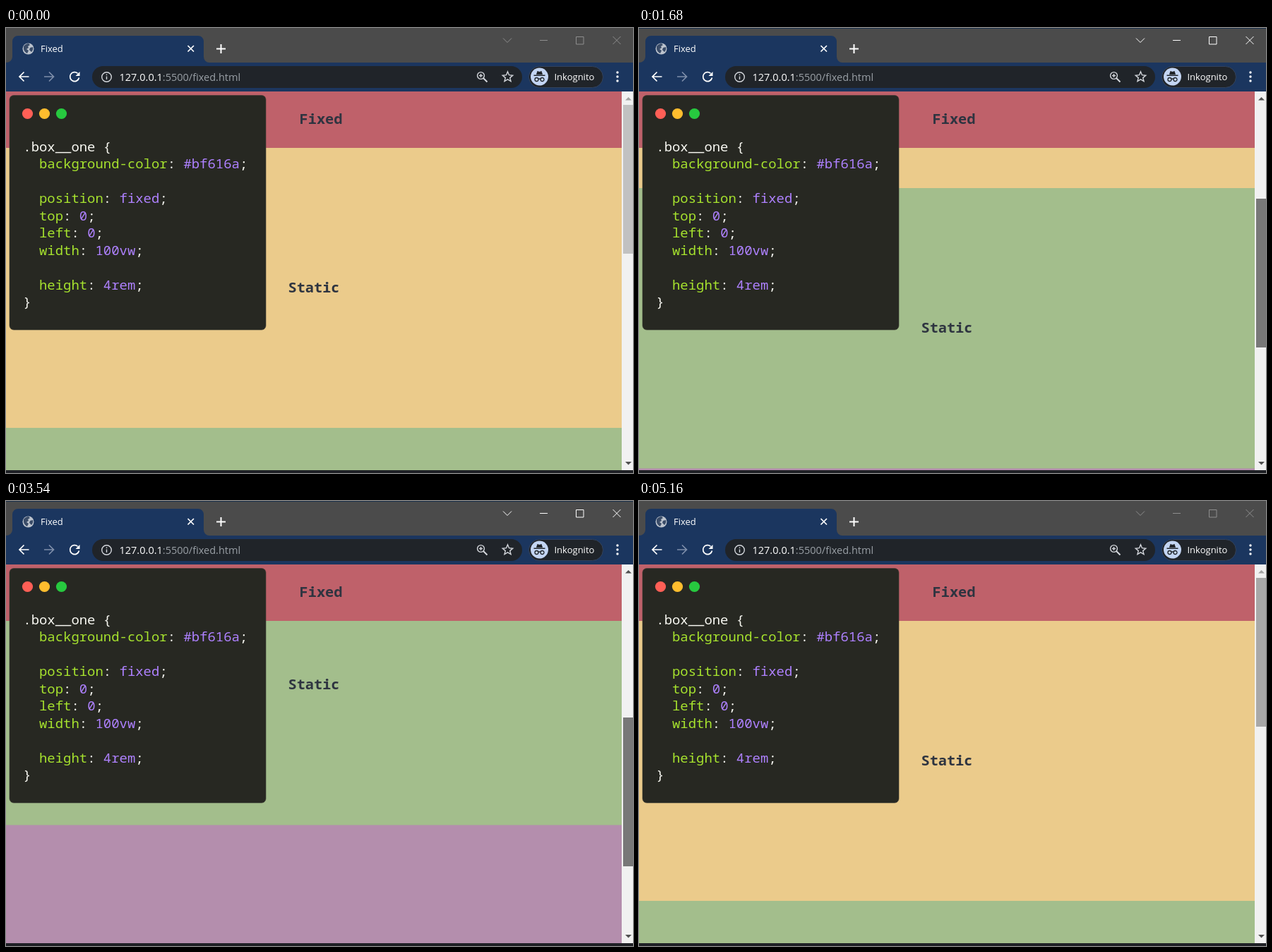
Recreate the animation shown at these times as an HTML page. Size 888 px wide and 631 px high, loop 5280 ms.

```html
<!DOCTYPE html>
<html lang="de">
<head>
<meta charset="utf-8">
<title>Fixed</title>
<style>
  html, body { margin: 0; width: 100%; height: 100%; overflow: hidden; background: #1e2025; }
  svg { display: block; width: 888px; height: 631px; }
  text { white-space: pre; }
  .ui { font: 13px "Open Sans", "Noto Sans", sans-serif; fill: #fff; }
  .url { font-size: 14.5px; }
  .label { font: bold 20.3px "Noto Sans Mono", "DejaVu Sans Mono", monospace; fill: #2e3440; text-anchor: middle; }
  .code { font: 18.93px "Noto Sans Mono", "DejaVu Sans Mono", monospace; fill: #f8f8f2; }
  .prop { fill: #a6e22e; }
  .val { fill: #ae81ff; }
  .line { fill: none; stroke: #fff; }
</style>
</head>
<body>
<svg viewBox="0 0 888 631">
  <defs><clipPath id="view"><rect y="90" width="872" height="537"/></clipPath></defs>

  <!-- page -->
  <g clip-path="url(#view)">
    <g id="page"></g>
    <rect y="90" width="872" height="80" fill="#bf616a"/>
    <text class="label" x="446" y="136">Fixed</text>
  </g>

  <!-- scrollbar -->
  <rect x="872" y="90" width="16" height="537" fill="#f1f1f1"/>
  <rect id="thumb" x="874" width="14" height="211"/>
  <path id="up" d="M877 102.5h9l-4.500-4.500z"/>
  <path id="down" d="M877 615h9l-4.500 4.500z"/>

  <!-- window frame -->
  <rect width="888" height="50" fill="#4b4b4b"/>
  <rect id="edge" width="888" height="1" fill="#1b3049"/>
  <path d="M0 49a9 8 0 0 0 9-8V19a8 8 0 0 1 8-8H272a8 8 0 0 1 8 8V41a8 8 0 0 0 8 8H888V90H0z" fill="#1b365f"/>
  <rect y="627" width="888" height="4" fill="#1e2025"/>
  <g id="buttons" class="line" stroke-width="1">
    <path d="M704 14.500l6 6 6-6M756 17.500h11M807.500 12.500h10.500v10.500h-10.500zM859.500 12l11 11m0-11l-11 11"/>
  </g>

  <!-- tab -->
  <circle cx="31.500" cy="29.500" r="8" fill="#bcc3cd"/>
  <path d="M25 26q3-4 7-4l2 2-3 2 1 2-3 2 3 2-2 4q-4-2-5-6zM34 28l4-1q1 4-2 7l-3-3z" fill="#3a4c68"/>
  <text class="ui" x="49" y="34">Fixed</text>
  <path class="line" stroke-width="1.700" d="M257.500 25l8.500 8.500m0-8.500l-8.500 8.500"/>
  <path class="line" stroke-width="2" d="M298 29.500h13m-6.500-6.500v13"/>

  <!-- toolbar -->
  <g class="line" stroke-width="1.700">
    <path d="M32.500 69H19m6.500-6.500L19 69l6.500 6.500"/>
    <path d="M54 69h13.500M61 62.500l6.500 6.500-6.500 6.500" stroke="#7f8fab"/>
    <path d="M101.500 64.300A6.500 6.500 0 1 0 103.500 70.500"/>
    <path d="M104.500 62v6h-6z" fill="#fff" stroke="none"/>
  </g>
  <rect x="122" y="54" width="609" height="31" rx="15.500" fill="#202429"/>
  <g class="line" stroke="#d4d7dc" stroke-width="1.400" style="stroke:#d4d7dc">
    <circle cx="142.500" cy="69.500" r="6.800"/>
    <path d="M142.500 68.500v4.500m0-7.500v1.600"/>
    <circle cx="672.500" cy="67.500" r="4.900"/>
    <path d="M676 71l5.500 5.500" stroke-width="2"/>
    <path d="M670 67.500h5m-2.500-2.500v5"/>
    <path id="star"/>
  </g>
  <text class="ui url" x="160.500" y="75">127.0.0.1<tspan fill="#9aa0a6">:5500/fixed.html</tspan></text>
  <rect x="740.500" y="54.500" width="105" height="30" rx="15" fill="#202429" stroke="#33435d"/>
  <circle cx="755.500" cy="69" r="12.500" fill="#c3d5f3"/>
  <path d="M751 66l1.500-5 3 1 3-1 1.500 5zM747.500 66.500h16v1.500h-16z" fill="#202429"/>
  <path d="M749 73a2.500 2.500 0 1 0 5 0a2.500 2.500 0 1 0-5 0m5-.5q1.500-1 3 0m0 .5a2.500 2.500 0 1 0 5 0a2.500 2.500 0 1 0-5 0" fill="none" stroke="#202429" stroke-width="1.300"/>
  <text class="ui" x="776.500" y="74">Inkognito</text>
  <path d="M866 63h0m0 6h0m0 6h0" class="line" stroke-width="3.400" stroke-linecap="round"/>

  <!-- code card -->
  <rect x="5" y="95.500" width="363" height="332.500" rx="6" fill="#272822" stroke="#3c3a33" stroke-width=".6"/>
  <circle cx="30.500" cy="121.500" r="7.600" fill="#ff5f56"/>
  <circle cx="54.500" cy="121.500" r="7.600" fill="#ffbd2e"/>
  <circle cx="78.500" cy="121.500" r="7.600" fill="#27c93f"/>
  <g id="code" class="code"></g>
</svg>
<script>
const LOOP = 5280, STEP = 60, MAX_SCROLL = 735;
const SECTION = 397.5, FIRST = 169.5;
const $ = id => document.getElementById(id);

$('page').innerHTML = ['#ebcb8b', '#a3be8c', '#b48ead'].map((color, i) => {
  const y = FIRST + i * SECTION;
  return `<rect y="${y}" width="872" height="${SECTION + 1}" fill="${color}"/>
    <text class="label" x="436" y="${y + 205}">Static</text>`;
}).join('');

const source = `.box__one {
  background-color: #bf616a;

  position: fixed;
  top: 0;
  left: 0;
  width: 100vw;

  height: 4rem;
}`;
$('code').innerHTML = source.split('\n').map((row, i) => {
  const html = row.replace(/^ +([\w-]+): (.+);/,
    '<tspan class="prop">$1</tspan>: <tspan class="val">$2</tspan>;');
  return `<text x="${row[0] === ' ' ? 47 : 24.3}" y="${174.5 + i * 24.55}">${html}</text>`;
}).join('');

$('star').setAttribute('d', 'M' + Array.from({ length: 10 }, (_, i) => {
  const r = i % 2 ? 3.4 : 7.6, a = i * Math.PI / 5;
  return [710.5 + r * Math.sin(a), 69.5 - r * Math.cos(a)].map(n => n.toFixed(1));
}).join('L') + 'z');

// Dragging the thumb: [time, scroll, speed per step]
const drag = [
  [720, 0, 6], [1320, 172.5, 27], [1980, 490, 31], [2520, MAX_SCROLL, 12],
  [3180, MAX_SCROLL, -26], [3540, 505, -39], [3840, 322, -37], [4380, 0, -20],
];

function scrollAt(t) {
  if (t <= 720 || t >= 4380) return 0;
  if (t >= 2520 && t <= 3180) return MAX_SCROLL;
  const i = drag.findIndex(key => key[0] > t);
  const [t0, s0, v0] = drag[i - 1], [t1, s1, v1] = drag[i];
  const u = (t - t0) / (t1 - t0), n = (t1 - t0) / STEP;
  const ease = u * u * (3 - 2 * u);
  return s0 + (s1 - s0) * ease + n * u * (1 - u) * (v0 * (1 - u) - v1 * u);
}

function draw(now) {
  const t = Math.floor(now % LOOP / STEP) * STEP;
  const s = Math.round(scrollAt(t) * 2) / 2;
  const active = t >= 780 && t < 5160;
  const pressed = t >= 780 && t < 4740;

  $('page').setAttribute('transform', `translate(0 ${-s})`);
  $('thumb').setAttribute('y', Math.round(109 + s * 288 / MAX_SCROLL));
  $('thumb').setAttribute('fill', pressed ? '#787878' : t < 420 ? '#c1c1c1' : '#a8a8a8');
  $('up').setAttribute('fill', s > 0 ? '#505050' : '#a3a3a3');
  $('down').setAttribute('fill', s < MAX_SCROLL ? '#505050' : '#a3a3a3');
  $('buttons').style.stroke = active ? '#fff' : '#8e8e8e';
  $('edge').style.opacity = active ? 1 : 0;
}

function tick() {
  draw(performance.now());
  requestAnimationFrame(tick);
}
tick();
</script>
</body>
</html>
```
